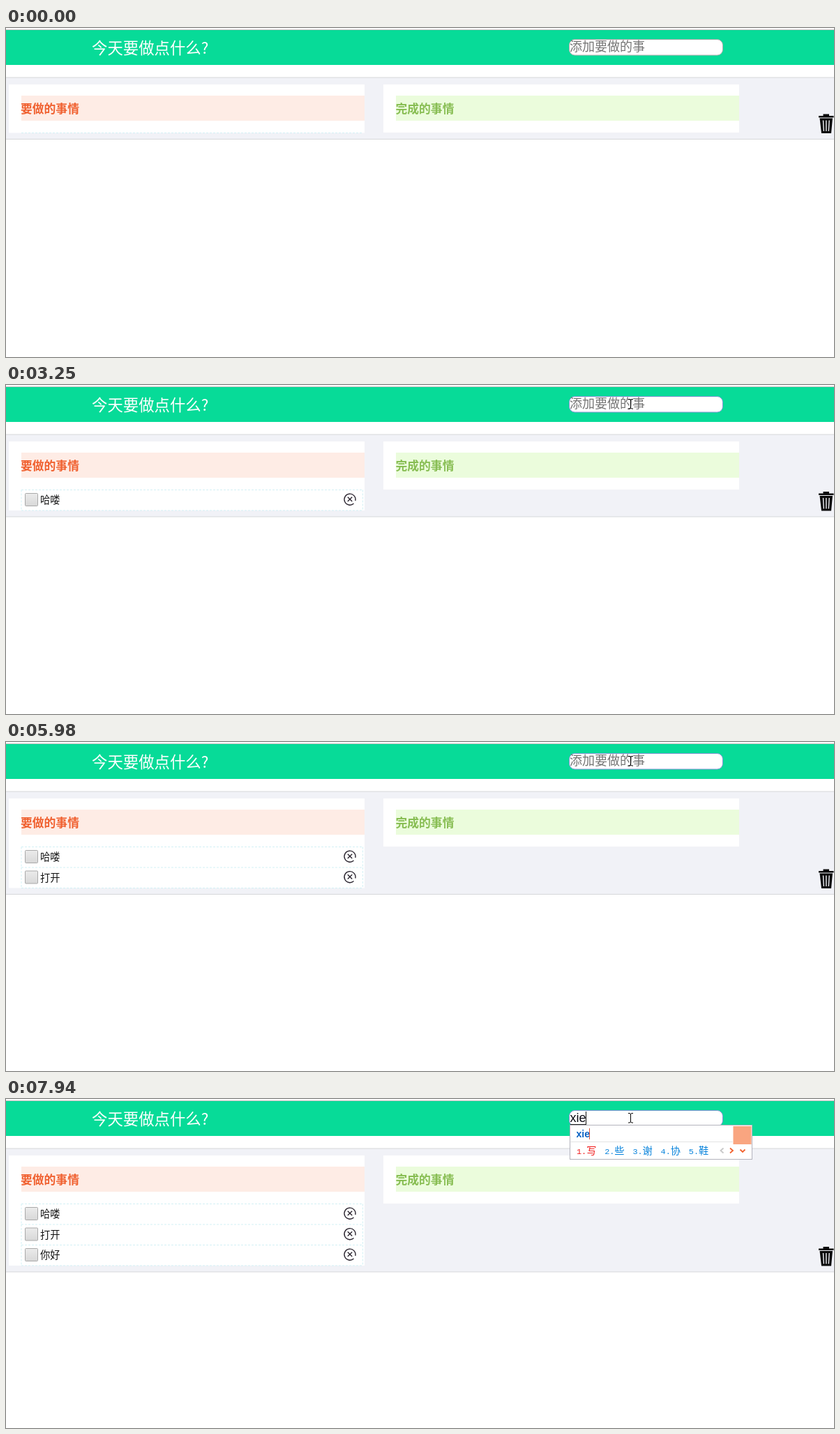
These frames come from a looping animation (1187 by 472 pixels, 8000 ms). An HTML page:

```html
<!DOCTYPE html>
<html lang="zh-CN">
<head>
<meta charset="utf-8">
<title>今天要做点什么?</title>
<style>
  html, body { margin: 0; width: 100%; height: 100%; overflow: hidden; background: #fff; }
  svg { display: block; width: 100%; height: 100%; }
  text { font-family: "Noto Sans CJK SC", "Noto Sans CJK", sans-serif; white-space: pre; }
  .title { font-size: 22.4px; fill: #fff; }
  .head { font-size: 16.8px; font-weight: bold; }
  .item { font-size: 14.3px; fill: #111; }
  .field { font-family: "Liberation Sans", "Noto Sans CJK SC", "Noto Sans CJK", sans-serif; font-size: 18px; }
  .pinyin { font-family: "Liberation Sans", Arial, sans-serif; font-size: 14px; font-weight: bold; fill: #0a62c4; }
  .cand { font-size: 14.2px; fill: #0a84dc; }
  .cand.first { fill: #f01414; }
  .half { font-family: "Liberation Mono", monospace; font-size: 11.8px; }
</style>
</head>
<body>
<svg viewBox="0 0 1187 472" preserveAspectRatio="xMinYMin meet">
  <defs>
    <linearGradient id="boxFill" x2="0" y2="1">
      <stop stop-color="#ebebeb"/><stop offset="1" stop-color="#d8d8d8"/>
    </linearGradient>
  </defs>

  <rect y="2" width="1187" height="1" fill="#c5c1c1"/>
  <rect y="3" width="1187" height="50" fill="#07db98"/>
  <text class="title" x="123" y="37.3">今天要做点什么?</text>
  <rect id="input" x="807.5" y="16.5" width="220" height="22.5" rx="8" fill="#fff"/>
  <g id="field"></g>

  <rect id="panel" x="-1" y="71" width="1189" fill="#f1f2f7" stroke="#d6d7da"/>
  <rect id="todo" x="4" y="81" width="510" fill="#fff"/>
  <rect x="22" y="97" width="492" height="36" fill="#feece5"/>
  <text class="head" x="21" y="122.4" fill="#f0602f">要做的事情</text>
  <rect x="541" y="81" width="510" height="69" fill="#fff"/>
  <rect x="559" y="97" width="492" height="36" fill="#ebfcdc"/>
  <text class="head" x="558.5" y="122.4" fill="#87bd52">完成的事情</text>
  <path d="M22 150.5H512" stroke="#d3f0f5" stroke-dasharray="3 2"/>
  <g id="rows"></g>

  <g id="trash">
    <path d="M1171.5 126V123.5H1180V126H1186.5V128.5H1165V126ZM1166.5 129.5H1185L1183 151H1169Z" fill="#0a0a0a"/>
    <path d="M1171.5 132.5L1172.4 148M1175.8 132.5V148M1180.2 132.5L1179.3 148" stroke="#f1f2f7" stroke-width="1.4"/>
  </g>

  <g id="popup"></g>
  <g id="pointer">
    <path id="arrow" d="M0 0V16L4 12.5L6.5 18L9 17L6.5 11.5H11Z" fill="#fff" stroke="#000"/>
    <path id="beam" d="M-3 -6.5H-1L.5 -5.5L2 -6.5H4M.5 -5.5V6M-3 7H-1L.5 6L2 7H4" fill="none" stroke="#000"/>
  </g>
</svg>
<script>
const LOOP = 8000, ROW = 29.5, CELL = 7.1, GAP = 11.8;
const ITEMS = ['哈喽', '打开', '你好'];
const $ = id => document.getElementById(id);

// time, rows shown, then what the field holds
const STEPS = [
  { t: 0, rows: 0 },
  { t: 850, rows: 0, caret: true },
  { t: 1410, rows: 0 },
  { t: 1720, rows: 0, keys: "h", list: '和 后 好 会 还' },
  { t: 1840, rows: 0, keys: "ha", list: '哈 哈哈 蛤 哈哈哈 铪' },
  { t: 2060, rows: 0, keys: "ha'l", list: '哈喽 哈利 哈勒 (,,･∀･)ﾉ゛hello HAL', left: 795.5 },
  { t: 2410, rows: 0, keys: "ha'lo", list: '哈喽 哈咯 哈罗 (,,･∀･)ﾉ゛hello 哈', left: 795.5 },
  { t: 2500, rows: 0, value: '哈喽', caret: true },
  { t: 2700, rows: 1, caret: true },
  { t: 3250, rows: 1 },
  { t: 3470, rows: 1, keys: "da", list: '大 打 达 答 搭' },
  { t: 3800, rows: 1, keys: "da'k", list: '打开 大口 大课 大款 大考' },
  { t: 3910, rows: 1, keys: "da'ka", list: '打卡 打开 大咖 大卡 达卡' },
  { t: 4130, rows: 1, keys: "da'kai", list: '打开 大开 大概 搭 达' },
  { t: 4680, rows: 1, value: '打开', caret: true },
  { t: 5210, rows: 1, value: '打开' },
  { t: 5440, rows: 2, caret: true },
  { t: 5980, rows: 2 },
  { t: 6520, rows: 2, keys: "n", list: '你 年 那 能 呢' },
  { t: 6640, rows: 2, keys: "ni", list: '你 呢 尼 泥 拟' },
  { t: 6850, rows: 2, keys: "ni'd", list: '你好 你和 你还 (*´▽｀)ノノ QOV' },
  { t: 7070, rows: 2, value: '你好', caret: true },
  { t: 7280, rows: 3, caret: true },
  { t: 7720, rows: 3, keys: "x", list: '下 想 小 些 需' },
  { t: 7830, rows: 3, keys: "xi", list: '系 西 洗 喜 细' },
  { t: 7940, rows: 3, keys: "xie", list: '写 些 谢 协 鞋' }
];

const isHalf = c => c <= '\xff' || (c >= '\uff61' && c <= '\uff9f');
const cells = s => [...s].reduce((n, c) => n + (isHalf(c) ? 1 : 2), 0);
const line = (x, y1, y2, color) =>
  `<path d="M${x} ${y1}V${y2}" stroke="${color}"/>`;
const chevron = (x, d, color) =>
  `<path transform="translate(${x} 74)" d="${d}" fill="none" stroke="${color}" stroke-width="1.8"/>`;

function row(text, i) {
  const y = 150.5 + i * ROW;
  return `<g transform="translate(0 ${y})">
    <path d="M22 ${ROW}H512M22 0V${ROW}M511.5 0V${ROW}" stroke="#d3f0f5" stroke-dasharray="3 2"/>
    <rect x="27.5" y="5" width="18" height="18" rx="1" fill="url(#boxFill)" stroke="#a9a9a9"/>
    <text class="item" x="49" y="19.8">${text}</text>
    <path d="M498.5 19.5A8 8 0 1 1 500.8 15.5M489.8 10.2L496.2 16.6M496.2 10.2L489.8 16.6"
      fill="none" stroke="#2b2530" stroke-width="1.4"/></g>`;
}

function candidate(text, x, first) {
  const body = text.replace(/[\x00-\xff]+/g, '<tspan class="half">$&</tspan>');
  return `<text class="cand${first ? ' first' : ''}" x="${x}" y="79.3">${body}</text>`;
}

function popup({ keys, list, left = 808.5 }) {
  let x = left + 9.5, cands = '';
  list.split(' ').forEach((word, i) => {
    const label = `${i + 1}.${word}`;
    cands += candidate(label, x, i === 0);
    x += cells(label) * CELL + GAP;
  });
  const right = Math.round(x - GAP + 62) + .5;
  $('popup').innerHTML = `
    <rect x="${left}" y="37.5" width="${right - left}" height="49" fill="#fff" stroke="#b3b3bd"/>
    <path d="M${left + 1} 61.5H${right - 28}" stroke="#e3e3e3"/>
    <text class="pinyin" x="${left + 9}" y="54.5">${keys}</text>
    ${cands}
    ${chevron(right - 43, 'M2 -3.5L-2 0L2 3.5', '#c8c8c8')}
    ${chevron(right - 29.5, 'M-2 -3.5L2 0L-2 3.5', '#f2622e')}
    ${chevron(right - 13.5, 'M-3.5 -1.5L0 2L3.5 -1.5', '#f2622e')}
    <rect x="${right - 27}" y="39" width="26" height="26" fill="#f9a580"/>`;
  const end = left + 9 + $('popup').querySelector('.pinyin').getComputedTextLength();
  $('popup').innerHTML += line(Math.floor(end) + .5, 42, 58, '#d8523c');
}

function field({ keys, value, caret }) {
  const typed = keys ? keys.replace("'", '') : value;
  const x = keys ? 808.5 : 808;
  $('field').innerHTML =
    `<text class="field" x="${x}" y="33.4" fill="${typed ? '#0b0b14' : '#757575'}">${typed || '添加要做的事'}</text>`;
  const end = typed ? x + $('field').firstChild.getComputedTextLength() : x;
  if (keys) $('field').innerHTML += `<path d="M809 36.5H${end}" stroke="#222"/>`;
  if (keys || caret) {
    const [y1, y2] = typed ? [18, 37] : [21, 34];
    $('field').innerHTML += line(Math.floor(end) + .5, y1, y2, '#111');
  }
}

function show(step) {
  const grow = step.rows * ROW;
  $('input').setAttribute('stroke', step.t ? '#8794d6' : '#b9adb0');
  $('panel').setAttribute('height', 88.5 + grow);
  $('todo').setAttribute('height', 69.5 + grow);
  $('trash').setAttribute('transform', `translate(0 ${grow})`);
  $('rows').innerHTML = ITEMS.slice(0, step.rows).map(row).join('');
  field(step);
  if (step.keys) popup(step);
  else $('popup').innerHTML = '';
}

// The pointer glides to the field in coarse, slowing hops.
function movePointer(t) {
  const hop = Math.min(6, Math.floor((t - 100) / 107));
  const p = 1 - (1 - hop / 6) ** 2;
  const x = Math.round(1055 - 160 * p), y = Math.round(301 - 274 * p);
  const inField = y < 39;
  $('pointer').setAttribute('visibility', t < 100 ? 'hidden' : 'visible');
  $('pointer').setAttribute('transform', `translate(${x} ${y})`);
  $('arrow').setAttribute('display', inField ? 'none' : 'inline');
  $('beam').setAttribute('display', inField ? 'inline' : 'none');
}

const start = performance.now();
let current;
function tick() {
  const t = (performance.now() - start) % LOOP;
  const step = STEPS.findLast(s => s.t <= t);
  if (step !== current) show(current = step);
  movePointer(t);
  requestAnimationFrame(tick);
}
tick();
</script>
</body>
</html>
```
